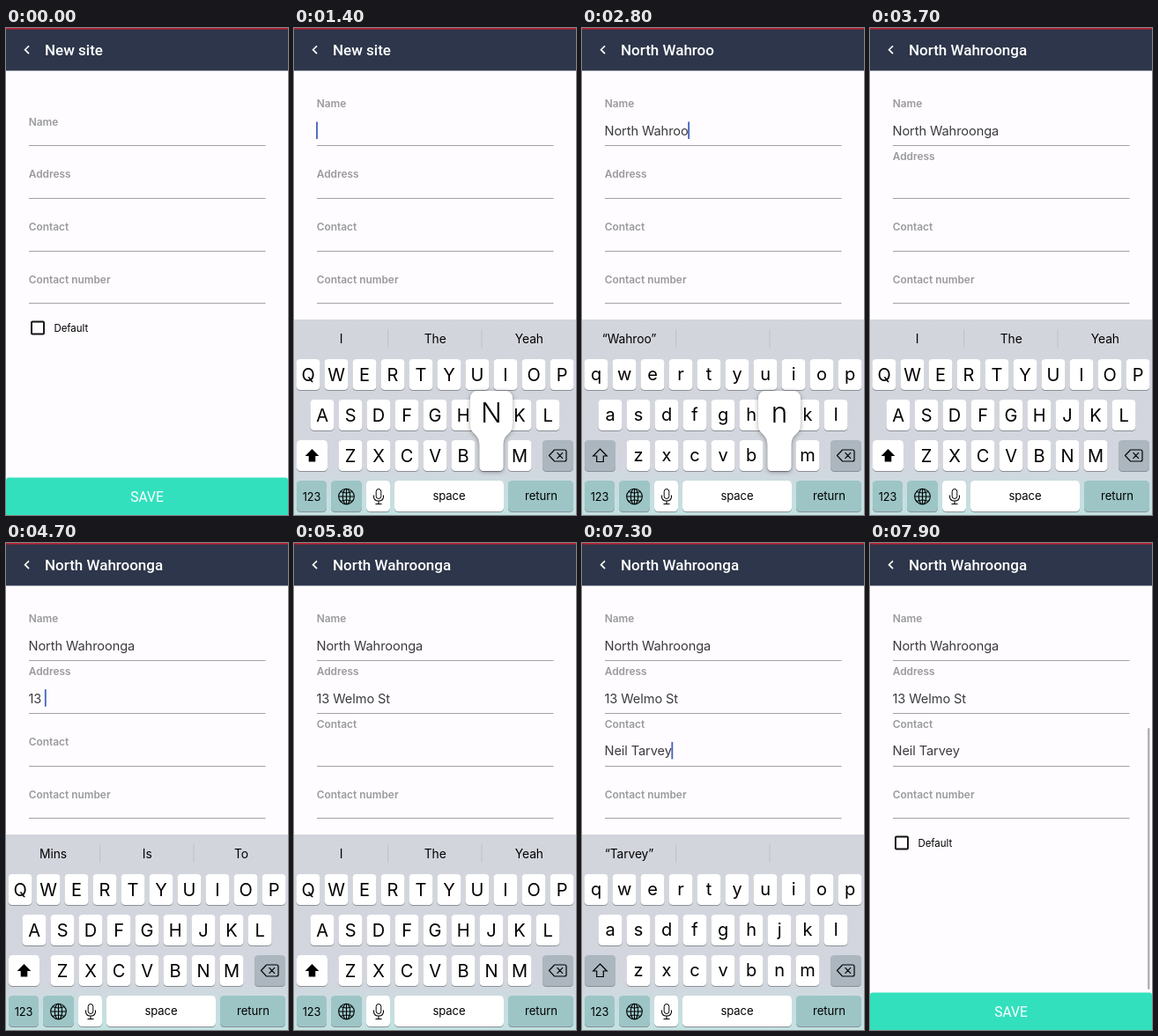
These frames come from a looping animation (320x553 px, 8 s). An HTML page with a canvas:

```html
<!DOCTYPE html>
<html lang="en">
<head>
<meta charset="utf-8">
<title>New site form</title>
<style>
  html, body { margin: 0; width: 100%; height: 100%; overflow: hidden; background: #fefcfe; }
  canvas { display: block; width: 320px; height: 553px; }
</style>
</head>
<body>
<canvas id="stage"></canvas>
<script>
const W = 320, H = 553, LOOP = 8000, HOLD = 92;
const UI = 'Inter, "Open Sans", sans-serif', APP = 'Roboto, sans-serif';
const canvas = document.getElementById('stage');
const c = canvas.getContext('2d');
const dpr = window.devicePixelRatio || 1;
canvas.width = W * dpr;
canvas.height = H * dpr;

const fields = [
  { label: 'Name', tap: 700 },
  { label: 'Address', tap: 3500 },
  { label: 'Contact', tap: 5650 },
  { label: 'Contact number', tap: Infinity }
];
const KEYS_IN = 750, KEYS_OUT = 7450, DIGITS_IN = 4000, DIGITS_OUT = 4640;

// Typing runs: each character is pressed, then inserted after HOLD ms
const strokes = [
  [0, 'North Wahroonga', 1360, 117],
  [1, '13 ', 4250, 150],
  [1, 'Welmo St', 4800, 95],
  [2, 'Neil Tarvey', 5950, 117]
].flatMap(([field, text, start, step]) =>
  [...text].map((ch, i) => ({ field, ch, at: start + i * step })));

const letters = ['qwertyuiop', 'asdfghjkl', 'zxcvbnm'];
const digits = ['1234567890', '-/:;()$&@"', ".,?!'"];
const DARK = '#abb6bf', TEAL = '#9dc5c6';

const clamp = v => Math.max(0, Math.min(1, v));
const ease = v => 1 - (1 - clamp(v)) ** 3;

function text(str, x, y, size, { weight = 400, color = '#000', align = 'left', font = UI } = {}) {
  c.font = `${weight} ${size}px ${font}`;
  c.letterSpacing = font === UI && weight === 400 ? `${-0.006 * size}px` : '0px';
  c.textAlign = align;
  c.fillStyle = color;
  c.fillText(str, x, y);
  return c.measureText(str).width;
}

function box(x, y, w, h, r, color) {
  c.fillStyle = color;
  c.beginPath();
  c.roundRect(x, y, w, h, r);
  c.fill();
}

function rect(x, y, w, h, color) {
  c.fillStyle = color;
  c.fillRect(x, y, w, h);
}

function stroke(path, color = '#000', width = 1.2) {
  c.strokeStyle = color;
  c.lineWidth = width;
  c.stroke(new Path2D(path));
}

function key(x, y, w, color = '#fff') {
  box(x, y + 1, w, 35, 4.5, '#8b9097');
  box(x, y, w, 35, 4.5, color);
}

function typed(field, t) {
  return strokes.filter(s => s.field === field && s.at + HOLD <= t).map(s => s.ch).join('');
}

function drawForm(t, values, focus) {
  rect(0, 0, W, H, '#fefcfe');
  rect(0, 0, W, 48.5, '#2d364a');
  rect(0, 0, W, 1.5, '#c4202f');
  stroke('M26 20.3L21.6 24.7L26 29.1', '#fff', 1.7);
  text(values[0] || 'New site', 44, 31, 17, { weight: 500, color: '#fff', font: APP });

  fields.forEach((f, i) => {
    const lift = ease((t - f.tap) / 150);
    text(f.label, 25.7, 110.5 + 59.9 * i - 20.3 * lift, 11.9, { weight: 600, color: '#9a999b' });
    rect(26, 133 + Math.round(59.8 * i), 268.5, 1, '#a3a2a4');
    const base = 122 + 59.7 * i;
    const end = 25.5 + text(values[i], 25.5, base, 14.6, { color: '#3b3a3d' });
    if (focus !== i) return;
    const last = Math.max(f.tap + 250,
      ...strokes.filter(s => s.field === i && s.at + HOLD <= t).map(s => s.at + HOLD));
    if (t >= last && (t - last) % 1000 < 600) rect(end - 0.4, base - 15.5, 1.8, 19.5, '#3d62c0');
  });

  c.strokeStyle = '#111';
  c.lineWidth = 1.9;
  c.beginPath();
  c.roundRect(29, 333.5, 14, 14, 1);
  c.stroke();
  text('Default', 54.5, 344.7, 11.5);

  if (t >= KEYS_OUT + 50) box(315, 210, 2.5, 297, 1.2, '#b3b2b5');
  box(0, 510.5, W, 46, 3, '#33e0be');
  text('SAVE', 160, 537.6, 15.6, { color: '#fff', align: 'center', font: APP });
}

function suggestions(value) {
  if (!value) return ['I', 'The', 'Yeah'];
  if (value === '13 ') return ['Mins', 'Is', 'To'];
  if (value.endsWith(' ')) return ['And', 'Is', 'To'];
  return [`“${value.split(' ').pop()}”`, '', ''];
}

function drawPopup(x, y, w, label) {
  const mid = x + w / 2;
  const left = Math.max(2, Math.min(W - 50, mid - 24)), right = left + 48, top = y - 56;
  c.save();
  c.shadowColor = 'rgba(0,0,0,.38)';
  c.shadowBlur = 5 * dpr;
  c.shadowOffsetY = dpr;
  c.fillStyle = '#fff';
  c.beginPath();
  c.moveTo(left + 8, top);
  c.arcTo(right, top, right, top + 8, 8);
  c.lineTo(right, top + 38);
  c.bezierCurveTo(right, top + 51, x + w, top + 47, x + w, top + 62);
  c.arcTo(x + w, y + 35, x, y + 35, 4.5);
  c.arcTo(x, y + 35, x, y, 4.5);
  c.lineTo(x, top + 62);
  c.bezierCurveTo(x, top + 47, left, top + 51, left, top + 38);
  c.arcTo(left, top, right, top, 8);
  c.fill();
  c.restore();
  text(label, left + 24, top + 36, 31.5, { weight: 350, align: 'center' });
}

function drawShift(on) {
  const arrow = 'M20.5 478L28.3 486H24.3V492.5H16.7V486H12.7Z';
  if (on) c.fill(new Path2D(arrow));
  else stroke(arrow);
}

function drawKeyboard(t, value) {
  const upper = !value || value.endsWith(' ');
  const numeric = t >= DIGITS_IN && t < DIGITS_OUT;
  const pressed = strokes.find(s => s.at <= t && t < s.at + HOLD)?.ch;
  const center = { align: 'center' };

  const back = c.createLinearGradient(0, 331, 0, H);
  back.addColorStop(0, '#d3d5dd');
  back.addColorStop(0.74, '#d3d6de');
  back.addColorStop(0.88, '#c9dde0');
  back.addColorStop(1, '#c2e2e1');
  rect(0, 331, W, 222, back);

  suggestions(value).forEach((s, i) => text(s, 53.5 + 106.7 * i, 357.5, 13.8, center));
  rect(106, 342, 1, 21, '#bfc2ca');
  rect(212.5, 342, 1, 21, '#bfc2ca');

  let popup;
  (numeric ? digits : letters).forEach((row, r) => {
    const wide = numeric && r === 2;
    const pitch = wide ? 44 : 32, w = wide ? 38 : 27, y = 376 + 46 * r;
    [...row].forEach((ch, i) => {
      const mid = 160 + (i - (row.length - 1) / 2) * pitch, x = mid - w / 2;
      const label = upper ? ch.toUpperCase() : ch;
      key(x, y, w);
      if (label === pressed) popup = [x, y, w, label];
      else text(label, mid, y + (upper || numeric ? 25 : 23.5), 20, center);
    });
  });

  key(3, 468, 35, upper && !numeric ? '#fff' : DARK);
  c.fillStyle = '#000';
  if (numeric) text('#+=', 20.5, 490, 12.8, center);
  else drawShift(upper);
  key(282, 468, 35, DARK);
  stroke('M289.5 485.5L295.5 479H307Q309 479 309 481V490Q309 492 307 492H295.5ZM298.5 482.2L305 488.8M305 482.2L298.5 488.8');

  key(3, 514, 34, TEAL);
  key(42, 514, 35, TEAL);
  key(82, 514, 27);
  key(114, 514, 124, pressed === ' ' ? DARK : '#fff');
  key(243, 514, 74, TEAL);
  text(numeric ? 'ABC' : '123', 20, 536.5, 12.8, center);
  text('space', 176, 536, 13.1, center);
  text('return', 280.5, 536, 13.1, center);

  // Globe and microphone
  c.strokeStyle = '#000';
  c.lineWidth = 1.1;
  for (const rx of [8.8, 4.2]) {
    c.beginPath();
    c.ellipse(59.5, 532, rx, 8.8, 0, 0, Math.PI * 2);
    c.stroke();
  }
  stroke('M59.5 523.2V540.8M50.7 532H68.3M52.8 526.7Q59.5 529.5 66.2 526.7M52.8 537.3Q59.5 534.5 66.2 537.3', '#000', 1);
  c.beginPath();
  c.roundRect(93.2, 523.5, 5.6, 11, 2.8);
  c.stroke();
  stroke('M90.5 530.5V532Q90.5 537 96 537Q101.5 537 101.5 532V530.5M96 537V540.5M92.5 540.5H99.5', '#000', 1.1);

  if (popup) drawPopup(...popup);
}

function draw(t) {
  c.setTransform(dpr, 0, 0, dpr, 0, 0);
  const values = fields.map((f, i) => typed(i, t));
  const focus = t < KEYS_OUT ? fields.findLastIndex(f => f.tap <= t) : -1;
  drawForm(t, values, focus);
  const shown = ease((t - KEYS_IN) / 380) * (1 - ease((t - KEYS_OUT) / 350));
  if (shown > 0) {
    c.translate(0, 222 * (1 - shown));
    drawKeyboard(t, focus < 0 ? values[2] : values[focus]);
  }
}

// The picture advances ten times a second
function tick() {
  draw(Math.floor(performance.now() % LOOP / 100) * 100);
  requestAnimationFrame(tick);
}
tick();
</script>
</body>
</html>
```
